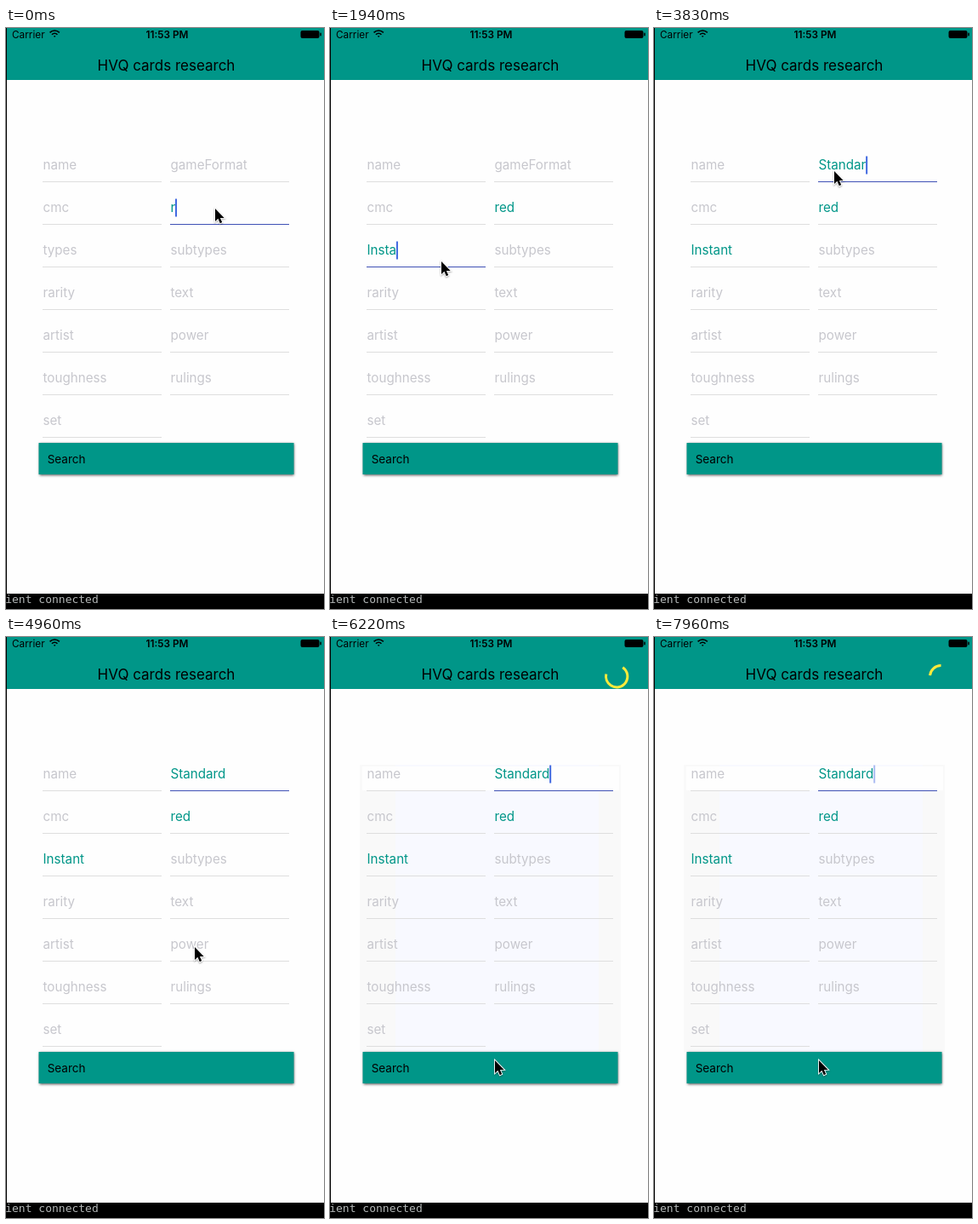
Animation, 374 px wide and 682 px high, one loop 8000 ms. Source, as an HTML page with a canvas:

```html
<!DOCTYPE html>
<html lang="en">
<head>
<meta charset="utf-8">
<style>
html, body { margin: 0; width: 100%; height: 100%; overflow: hidden; background: #000; }
canvas { display: block; }
</style>
</head>
<body>
<canvas id="stage" width="374" height="682"></canvas>
<script>
const ctx = document.getElementById('stage').getContext('2d');
const LOOP = 8000, TEAL = '#009688', BLUE = '#3f51b5';
const TAP = 5450, SPIN_START = 5740, SPIN_CYCLE = 1010, BLINK = 990;
const LEFT = 43.5, RIGHT = 193.5;

// keys: the time at which each letter of the value appears
const fields = [
  { label: 'name' },
  { label: 'gameFormat', value: 'Standard', focus: 2850, blur: Infinity,
    keys: [3130, 3240, 3340, 3440, 3540, 3680, 3830, 4010] },
  { label: 'cmc' },
  { label: '', value: 'red', focus: -500, blur: 852, keys: [0, 180, 320] },
  { label: 'types', value: 'Instant', focus: 958, blur: 2800,
    keys: [1470, 1530, 1640, 1820, 1890, 1960, 2050] },
  ...['subtypes', 'rarity', 'text', 'artist', 'power', 'toughness', 'rulings', 'set']
    .map(label => ({ label }))
];

const pointer = [
  [0, 246, 212], [430, 246, 212], [800, 131, 274], [2290, 131, 274], [2620, 212, 168],
  [4310, 212, 168], [4780, 219, 343], [4940, 219, 343], [4960, 222, 364],
  [5180, 196, 517], [5400, 194, 497]
];

const clamp = v => Math.max(0, Math.min(1, v));
const ramp = (t, from, to) => clamp((t - from) / (to - from));
const ease = u => (u = clamp(u)) < .5 ? 2 * u * u : 1 - 2 * (1 - u) * (1 - u);

function rect(color, x, y, w, h) {
  ctx.fillStyle = color;
  ctx.fillRect(x, y, w, h);
}

function text(str, x, y, size, color = '#000', weight = 400, family = 'Inter, sans-serif') {
  ctx.font = `${weight} ${size}px ${family}`;
  ctx.fillStyle = color;
  ctx.fillText(str, x, y);
}

function drawHeader() {
  rect(TEAL, 1, 0, 373, 61);
  text('Carrier', 7, 11.5, 11.8);
  ctx.textAlign = 'center';
  text('11:53 PM', 189.5, 11.5, 11.8, '#000', 600);
  text('HVQ cards research', 188.5, 49.5, 17);
  ctx.textAlign = 'left';

  ctx.strokeStyle = '#000';
  ctx.lineWidth = 1.6;
  for (const r of [1, 4.6, 8]) {
    ctx.beginPath();
    ctx.arc(57.2, 11, r, -Math.PI * .75, -Math.PI * .25);
    ctx.stroke();
  }
  ctx.fillStyle = '#000';
  ctx.beginPath();
  ctx.roundRect(346.5, 3, 22, 9, 2);
  ctx.roundRect(369.3, 5.5, 1.5, 4, .7);
  ctx.fill();
}

// Pale patches left behind the form once the button is pressed
function drawTint(t) {
  if (t < TAP + 60) return;
  rect('#f9f9f9', 35, 150, 307, 337);
  rect('#f8f9ff', 77, 150, 239, 337);
  if (t > 6000) rect('#fefefe', 38, 152, 302, 28);
}

function caretAlpha(age) {
  const phase = age % BLINK;
  return age < 0 ? 0 : Math.max(1 - ramp(phase, 570, 640), ramp(phase, 955, 1015), 
    age > BLINK ? 0 : 0);
}

function drawField(field, index, t) {
  const x = index % 2 ? RIGHT : LEFT, y = 150 + 50 * (index >> 1);
  const { label, value = '', focus, blur, keys = [] } = field;
  const typed = value.slice(0, keys.filter(k => k <= t).length);
  text(typed || label, x, y + 16.3, 15.2, typed ? TEAL : '#c7c7cd');
  rect('#dedede', x - .5, y + 30, 140, 1);
  if (!value) return;

  const width = 140 * (ease((t - focus) / 200) - ease((t - blur) / 200));
  rect(BLUE, x + 69.5 - width / 2, y + 30, width, 1);

  if (t >= focus - 40 && t < blur) {
    const last = Math.max(focus - 40, ...keys.filter(k => k <= t));
    ctx.globalAlpha = caretAlpha(t - last);
    rect('#4169e1', x + ctx.measureText(typed).width - .2, y + .5, 2, 21);
    ctx.globalAlpha = 1;
  }
}

function drawButton(t) {
  ctx.save();
  ctx.shadowColor = 'rgba(0,0,0,.7)';
  ctx.shadowBlur = 3;
  ctx.shadowOffsetY = 1;
  rect(TEAL, 38.5, 487, 300, 37);
  ctx.restore();
  text('Search', 48.7, 510.7, 13.5);

  const fade = 1 - ramp(t, 5780, 6040);
  if (t < TAP || !fade) return;
  ctx.save();
  ctx.beginPath();
  ctx.rect(38.5, 487, 300, 37);
  ctx.clip();
  ctx.globalAlpha = fade;
  rect(`rgba(255,255,255,${.15 * ramp(t, TAP, TAP + 120)})`, 38, 487, 301, 37);
  ctx.fillStyle = 'rgba(255,255,255,.21)';
  ctx.beginPath();
  ctx.arc(196.5, 502, Math.min(160, .6 * (t - TAP)), 0, 2 * Math.PI);
  ctx.fill();
  ctx.restore();
}

function drawSpinner(t) {
  const age = t - SPIN_START;
  if (age < 0) return;
  const turns = Math.floor(age / SPIN_CYCLE), u = age / SPIN_CYCLE - turns;
  const base = -90 + .07 * age + 240 * turns;
  const tail = base + 240 * ease(2 * u - 1), head = base + 10 + 240 * ease(2 * u);
  ctx.strokeStyle = '#ffeb3b';
  ctx.lineWidth = 3;
  ctx.beginPath();
  ctx.arc(337.2, 46.3, 12.7, tail * Math.PI / 180, head * Math.PI / 180);
  ctx.stroke();
}

function drawPointer(t) {
  const next = pointer.findIndex(p => p[0] > t);
  const b = pointer.at(next), a = next > 0 ? pointer[next - 1] : b;
  const u = ease((t - a[0]) / (b[0] - a[0] || 1));
  ctx.save();
  ctx.translate(a[1] + (b[1] - a[1]) * u, a[2] + (b[2] - a[2]) * u);
  const arrow = new Path2D('M0 0V15L3.4 11.8L5.8 17.2L8.2 16.1L5.9 10.9H10.7Z');
  ctx.shadowColor = 'rgba(0,0,0,.35)';
  ctx.shadowBlur = 2;
  ctx.shadowOffsetY = 1;
  ctx.strokeStyle = '#fff';
  ctx.lineWidth = 1.8;
  ctx.stroke(arrow);
  ctx.shadowColor = 'transparent';
  ctx.fillStyle = '#000';
  ctx.fill(arrow);
  ctx.restore();
}

function draw(now) {
  const t = now % LOOP;
  rect('#000', 0, 0, 374, 682);
  rect('#fefefe', 1, 61, 373, 603);
  text('ient connected', -.8, 675, 13, '#b4b8b8', 400, '"DejaVu Sans Mono", monospace');
  drawHeader();
  drawTint(t);
  fields.forEach((field, i) => drawField(field, i, t));
  drawButton(t);
  drawSpinner(t);
  drawPointer(t);
  requestAnimationFrame(draw);
}
requestAnimationFrame(draw);
</script>
</body>
</html>
```
